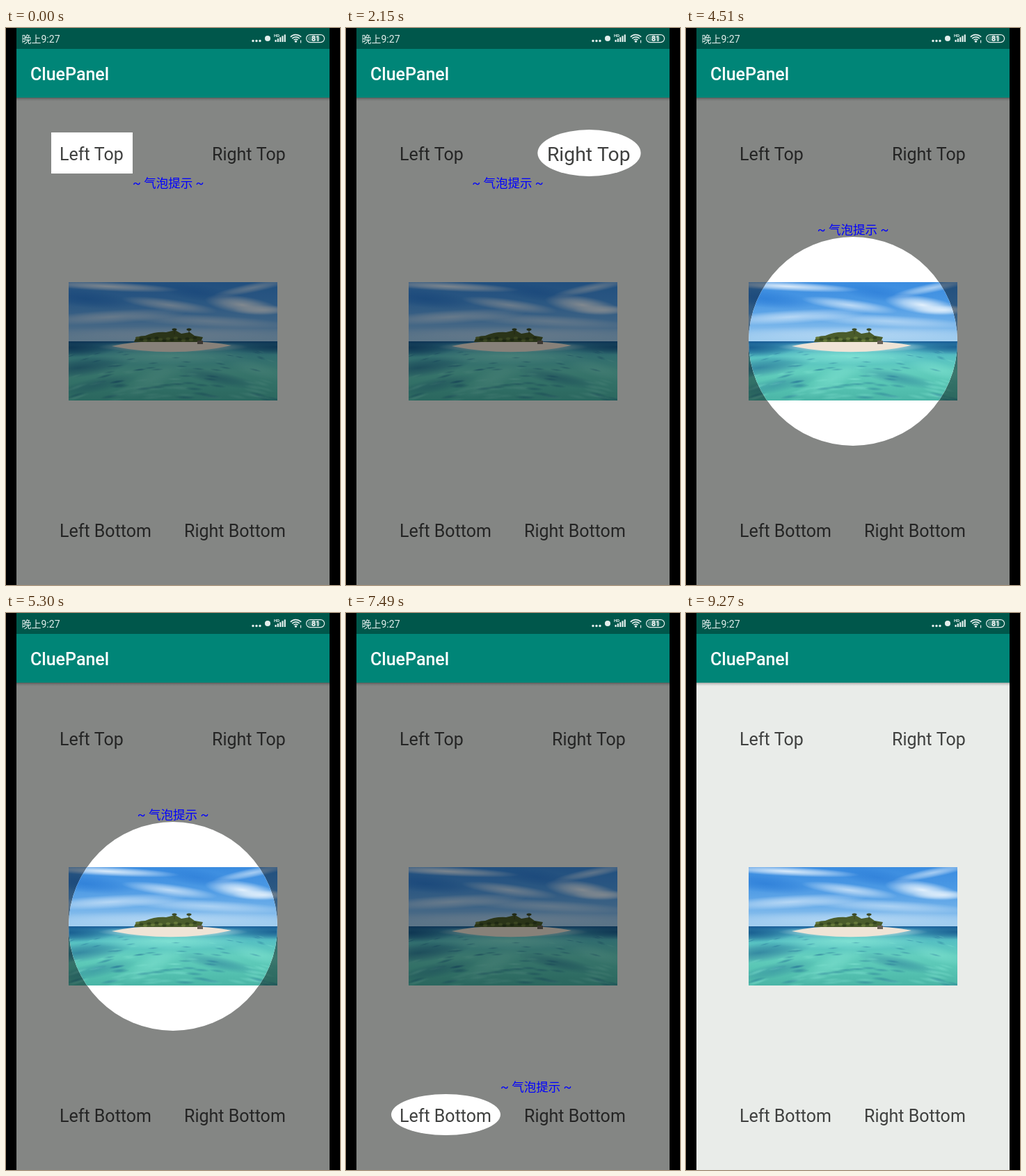
Write an HTML page with a canvas that moves like this. It is 480 px wide and 800 px high and loops after 9.31 s.

```html
<!DOCTYPE html>
<html lang="zh">
<head>
<meta charset="utf-8">
<title>CluePanel</title>
<style>
  html, body { margin: 0; width: 100%; height: 100%; overflow: hidden; background: #000; }
  canvas { display: block; width: 480px; height: 800px; }
</style>
</head>
<body>
<canvas id="stage" width="480" height="800"></canvas>
<script>
const ctx = document.getElementById('stage').getContext('2d');
const LOOP = 9310, PULSE = 500, GROW = 0.2;
const SANS = 'Roboto, "Noto Sans CJK SC", "Noto Sans CJK", sans-serif';
const PHOTO = { x: 90, y: 365, w: 300, h: 170 };

const LABELS = [
  { text: 'Left Top', x: 77, y: 190 },
  { text: 'Right Top', x: 296, y: 190 },
  { text: 'Left Bottom', x: 77, y: 731 },
  { text: 'Right Bottom', x: 256, y: 731 }
];

// Each step highlights one view and places the hint text beside it.
const STEPS = [
  { at: 0, box: [65, 150, 117, 59], shape: 'rect', label: 0, hint: [182, 228.7] },
  { at: 2000, box: [284, 150, 131, 59], shape: 'oval', label: 1, hint: [181.2, 228.7], pulse: true },
  { at: 3940, box: [90, 300, 300, 300], shape: 'oval', hint: [188.8, 295.7] },
  { at: 5627, box: [65, 691, 157, 59], shape: 'oval', label: 2, hint: [222, 686.7], pulse: true },
  { at: 7740 }
];

function write(c, text, x, y, font, color) {
  c.font = font;
  c.fillStyle = color;
  c.fillText(text, x, y);
}

function fill(c, color, x, y, w, h) {
  c.fillStyle = color;
  c.fillRect(x, y, w, h);
}

function ramp(c, y0, y1, colors) {
  const g = c.createLinearGradient(0, y0, 0, y1);
  colors.forEach((col, i) => g.addColorStop(i / (colors.length - 1), col));
  return g;
}

// Soft-edged ellipse
function blob(c, rgb, alpha, x, y, rx, ry, tilt = 0) {
  c.save();
  c.translate(x, y);
  c.rotate(tilt);
  c.scale(rx, ry);
  const g = c.createRadialGradient(0, 0, 0, 0, 0, 1);
  g.addColorStop(0, `rgba(${rgb},${alpha})`);
  g.addColorStop(0.5, `rgba(${rgb},${alpha * 0.6})`);
  g.addColorStop(1, `rgba(${rgb},0)`);
  fill(c, g, -1, -1, 2, 2);
  c.restore();
}

function disc(c, color, x, y, rx, ry = rx) {
  c.fillStyle = color;
  c.beginPath();
  c.ellipse(x, y, rx, ry, 0, 0, Math.PI * 2);
  c.fill();
}

function seeded(seed) {
  return () => (seed = (seed * 16807) % 2147483647) / 2147483647;
}

function drawSky(c) {
  const white = '235,245,253';
  fill(c, ramp(c, 0, 85, ['#3a8ce0', '#4a98e4', '#6caee9', '#a6d0f0']), 0, 0, 300, 85);
  blob(c, '36,118,212', 0.6, 25, 24, 70, 13, 0.1);
  blob(c, '36,118,212', 0.5, 185, 15, 60, 12, 0.15);
  blob(c, white, 0.9, 55, 6, 105, 7, 0.05);
  blob(c, white, 0.7, 145, 33, 70, 9, 0.13);
  blob(c, white, 0.95, 250, 33, 55, 13, 0.15);
  blob(c, white, 0.8, 280, 40, 45, 7);
  blob(c, white, 0.6, 265, 8, 60, 7, -0.2);
  blob(c, white, 0.6, 60, 50, 110, 10, -0.06);
  blob(c, white, 0.5, 200, 56, 120, 9, 0.05);
  blob(c, white, 0.35, 150, 74, 200, 11);
}

function drawSea(c) {
  const deep = '18,84,138', pale = '135,232,214', rand = seeded(7);
  c.save();
  c.beginPath();
  c.rect(0, 85, 300, 85);
  c.clip();
  fill(c, ramp(c, 85, 170, ['#3486b4', '#55bfc2', '#63cebe', '#56c3b2', '#4ab5a6']), 0, 85, 300, 85);
  fill(c, ramp(c, 84, 90, ['rgba(20,84,146,.95)', 'rgba(20,84,146,0)']), 0, 84, 300, 6);
  blob(c, deep, 0.85, 0, 94, 70, 14);
  blob(c, deep, 0.8, 300, 93, 75, 11);
  blob(c, deep, 0.55, 15, 123, 75, 14, -0.12);
  blob(c, deep, 0.3, 40, 148, 60, 11, -0.2);
  blob(c, deep, 0.35, 215, 138, 60, 10, 0.2);
  blob(c, pale, 0.8, 145, 106, 115, 13);
  blob(c, pale, 0.45, 120, 140, 50, 16, -0.5);
  blob(c, pale, 0.4, 270, 125, 45, 12, 0.3);
  for (let i = 0; i < 110; i++) {
    const depth = rand(), x = rand() * 300;
    blob(c, i % 2 ? deep : pale, 0.3, x, 100 + depth * 70, 6 + depth * 10, 1 + depth * 2, (x - 150) * 0.002);
  }
  blob(c, '240,246,236', 1, 150, 93, 108, 8);
  c.restore();
}

function drawIsland(c) {
  c.fillStyle = '#efe4d6';
  c.beginPath();
  c.moveTo(62, 92);
  c.quadraticCurveTo(95, 84, 140, 85);
  c.quadraticCurveTo(205, 84, 234, 91);
  c.quadraticCurveTo(150, 109, 62, 92);
  c.fill();

  c.fillStyle = '#4a5c2b';
  c.beginPath();
  c.moveTo(94, 86);
  c.quadraticCurveTo(96, 77, 110, 77);
  c.quadraticCurveTo(124, 71, 140, 72);
  c.lineTo(153, 69);
  c.lineTo(162, 74);
  c.lineTo(174, 72);
  c.lineTo(181, 77);
  c.lineTo(193, 79);
  c.lineTo(190, 86);
  c.closePath();
  c.fill();
  for (let i = 0; i < 16; i++) disc(c, i % 2 ? '#34451f' : '#66793a', 99 + i * 5.5, 80 + (i * 7 % 5), 3, 1.8);
  for (const x of [152, 173]) {
    fill(c, '#3b4424', x - 0.5, 67, 1, 8);
    disc(c, '#3b4a25', x, 68, 3.5, 1.8);
  }
  fill(c, '#6a6258', 185, 84, 8, 5);
}

function makePhoto() {
  const cv = document.createElement('canvas');
  cv.width = PHOTO.w;
  cv.height = PHOTO.h;
  const c = cv.getContext('2d');
  drawSky(c);
  drawSea(c);
  drawIsland(c);
  return cv;
}
const photo = makePhoto();

function drawPhoto() {
  ctx.drawImage(photo, PHOTO.x, PHOTO.y);
}

function drawLabel(l) {
  write(ctx, l.text, l.x, l.y, '25px ' + SANS, '#3f403f');
}

function drawStatus() {
  const ink = '#e3eeec';
  fill(ctx, '#00574b', 15, 0, 450, 30);
  write(ctx, '晚上9:27', 22.5, 21, '14px ' + SANS, ink);
  for (let i = 0; i < 3; i++) disc(ctx, ink, 355 + i * 5, 18.5, 1.7);
  disc(ctx, ink, 376, 15, 4);
  write(ctx, 'HD', 385, 13, 'bold 6px ' + SANS, ink);
  for (let i = 0; i < 5; i++) fill(ctx, ink, 386.5 + i * 3.3, 17 - i * 1.9, 2.2, 3 + i * 1.9);

  ctx.strokeStyle = ink;
  ctx.lineWidth = 1.7;
  for (const r of [4, 7.2, 10.4]) {
    ctx.beginPath();
    ctx.arc(416.5, 20, r, -Math.PI * 0.76, -Math.PI * 0.24);
    ctx.stroke();
  }
  disc(ctx, ink, 416.5, 19.2, 1.6);
  fill(ctx, ink, 423, 17.5, 1.2, 4);

  ctx.lineWidth = 1.2;
  ctx.beginPath();
  ctx.roundRect(431.6, 9.6, 26, 11, 5.5);
  ctx.stroke();
  ctx.fillStyle = 'rgba(227,238,236,.25)';
  ctx.beginPath();
  ctx.roundRect(433.5, 11.5, 18, 7.2, 3.6);
  ctx.fill();
  write(ctx, '81', 439, 19, 'bold 10.5px ' + SANS, '#fff');
}

function drawScreen() {
  fill(ctx, '#000', 0, 0, 480, 800);
  fill(ctx, '#e9ece9', 15, 100, 450, 700);
  fill(ctx, ramp(ctx, 100, 105, ['rgba(0,0,0,.3)', 'rgba(0,0,0,.1)', 'rgba(0,0,0,0)']), 15, 100, 450, 5);
  drawStatus();
  fill(ctx, '#008577', 15, 30, 450, 70);
  write(ctx, 'CluePanel', 35, 75, '500 25px ' + SANS, '#fff');
  LABELS.forEach(drawLabel);
  drawPhoto();
}

function pulseScale(step, t) {
  const p = (t - step.at) / PULSE;
  return step.pulse && p < 1 ? 1 + GROW * (1 - Math.cos(p * Math.PI * 2)) / 2 : 1;
}

function drawGuide(step, t) {
  const [x, y, w, h] = step.box, cx = x + w / 2, cy = y + h / 2;
  const s = pulseScale(step, t);
  fill(ctx, 'rgba(0,0,0,.437)', 15, 100, 450, 700);

  ctx.save();
  ctx.translate(cx, cy);
  ctx.scale(s, s);
  ctx.translate(-cx, -cy);
  if (step.shape === 'rect') fill(ctx, '#fff', x, y, w, h);
  else disc(ctx, '#fff', cx, cy, w / 2, h / 2);
  if (step.label !== undefined) {
    drawLabel(LABELS[step.label]);
  } else {
    ctx.beginPath();
    ctx.arc(cx, cy, w / 2, 0, Math.PI * 2);
    ctx.clip();
    drawPhoto();
  }
  ctx.restore();

  write(ctx, '~ 气泡提示 ~', step.hint[0], step.hint[1], '17.5px ' + SANS, '#00f');
}

function render(t) {
  const step = STEPS.filter(s => s.at <= t).pop();
  drawScreen();
  if (step.box) drawGuide(step, t);
}

const start = performance.now();
function frame() {
  render((performance.now() - start) % LOOP);
  requestAnimationFrame(frame);
}
frame();
</script>
</body>
</html>
```
